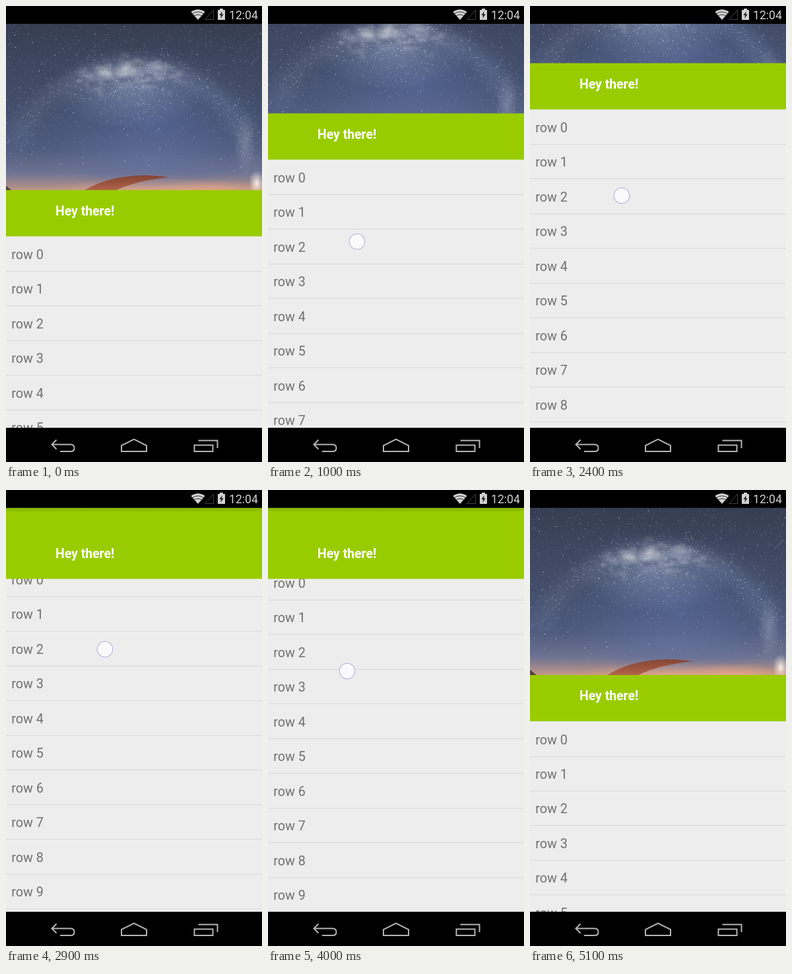
Animation of 388x690 px, one loop 5200 ms. Source, as an HTML page with a canvas:

```html
<!DOCTYPE html>
<html lang="en">
<head>
<meta charset="utf-8">
<title>Collapsing header</title>
<style>
html, body { margin: 0; width: 100%; height: 100%; overflow: hidden; background: #000; }
canvas { display: block; }
</style>
</head>
<body>
<canvas id="stage" width="388" height="690"></canvas>
<script>
const W = 388, LOOP = 5200, STEP = 100;
const BAR = 27, NAV = 638.25, HEADER_TOP = 278.5, HEADER_H = 70, ROW_H = 52.45;
const PIN = 214, FILL_START = 193;
const GREEN = '#99cc00', ICON = '#d2d2d2';
const ctx = document.getElementById('stage').getContext('2d');

// [time, value...]
const SCROLL = [[0, 0], [200, 0], [600, 38.5], [1100, 135], [1600, 213], [1900, 217], [2400, 192],
  [2900, 240], [3400, 285], [4000, 235], [4400, 110], [4800, 8], [5000, -1.5], [5100, -1.5]];
const TOUCH = [[200, 128, 468], [600, 131, 425], [1100, 136, 340], [1600, 142, 271], [1900, 143, 266],
  [2400, 139, 287], [2900, 150, 241], [3400, 153, 196], [4000, 120, 274], [4500, 112, 450]];

// Monotone cubic interpolation: never overshoots its keys.
function track(keys, t, col) {
  const last = keys.length - 1;
  if (t <= keys[0][0]) return keys[0][col];
  if (t >= keys[last][0]) return keys[last][col];
  const slope = i => (keys[i + 1][col] - keys[i][col]) / (keys[i + 1][0] - keys[i][0]);
  const tangent = i => {
    if (i === 0 || i === last) return 0;
    const a = slope(i - 1), b = slope(i);
    return a * b <= 0 ? 0 : 2 * a * b / (a + b);
  };
  const i = keys.findIndex(k => k[0] > t) - 1;
  const h = keys[i + 1][0] - keys[i][0], u = (t - keys[i][0]) / h, v = 1 - u;
  return keys[i][col] * v * v * (1 + 2 * u) + keys[i + 1][col] * u * u * (3 - 2 * u)
    + h * u * v * (tangent(i) * v - tangent(i + 1) * u);
}

function random(seed) {
  return () => (seed = (seed * 16807) % 2147483647) / 2147483647;
}

function makeSky() {
  const H = 254, sky = document.createElement('canvas');
  sky.width = W;
  sky.height = H;
  const c = sky.getContext('2d'), rnd = random(71);
  const bell = () => rnd() + rnd() + rnd() - 1.5;

  const base = c.createLinearGradient(0, 0, 0, H);
  [[0, '#363d52'], [.25, '#3e475f'], [.5, '#434e6c'], [.75, '#505c7e'], [.89, '#6d7392'],
    [.95, '#9c868c'], [1, '#c79a85']].forEach(([p, color]) => base.addColorStop(p, color));
  c.fillStyle = base;
  c.fillRect(0, 0, W, H);

  function glow(x, y, rx, ry, rgb, alpha) {
    c.save();
    c.translate(x, y);
    c.scale(rx, ry);
    const g = c.createRadialGradient(0, 0, 0, 0, 0, 1);
    g.addColorStop(0, `rgba(${rgb},${alpha})`);
    g.addColorStop(.5, `rgba(${rgb},${alpha * .45})`);
    g.addColorStop(1, `rgba(${rgb},0)`);
    c.fillStyle = g;
    c.fillRect(-1, -1, 2, 2);
    c.restore();
  }

  // Point on the arch of the galaxy; a runs from 0 (left) to 1 (right).
  const arch = a => {
    const angle = Math.PI * (1 - a);
    return [192 + 184 * Math.cos(angle), 236 - 168 * Math.pow(Math.sin(angle), .9)];
  };

  // Haze inside the arch, brightest just below its top
  glow(225, 150, 170, 110, '84,102,150', .75);
  glow(190, 98, 120, 62, '148,160,190', .5);
  glow(215, 205, 160, 50, '112,124,168', .4);
  for (let a = .1; a < 1; a += .02) {
    const [x, y] = arch(a);
    glow(x, y, 30, 24, '138,151,184', .05 + .06 * a * Math.sin(a * Math.PI));
  }
  for (let i = 0; i < 90; i++) {
    const x = 185 + bell() * 80, y = 74 + bell() * 24 + Math.abs(x - 185) * .12;
    glow(x, y, 4 + rnd() * 11, 3 + rnd() * 6, '215,220,228', .15);
  }
  glow(152, 74, 24, 14, '232,232,230', .4);
  glow(181, 69, 18, 14, '245,242,238', .55);
  glow(228, 66, 30, 11, '226,230,238', .45);
  glow(200, 62, 16, 6, '70,72,90', .5);
  glow(362, 180, 16, 48, '190,192,208', .3);
  glow(380, 242, 12, 20, '255,246,236', .95);
  glow(225, 253, 165, 20, '239,174,139', .65);
  glow(315, 253, 90, 18, '236,168,137', .6);

  const star = (x, y, alpha, size) => {
    c.fillStyle = `rgba(222,229,244,${alpha})`;
    c.fillRect(x, y, size, size);
  };
  for (let i = 0; i < 2600; i++) {
    const y = rnd() * 232;
    star(rnd() * W, y, rnd() * .32 * (1 - y / 350), .7 + rnd() * .8);
  }
  for (let i = 0; i < 700; i++) {
    const [x, y] = arch(.08 + rnd() * .9);
    star(x + bell() * 30, y + bell() * 30, .1 + rnd() * .35, .6 + rnd());
  }
  for (let i = 0; i < 700; i++) star(195 + bell() * 95, 95 + bell() * 60, .1 + rnd() * .35, .6 + rnd());
  for (let i = 0; i < 45; i++) star(rnd() * W, rnd() * 215, .6, 1.4);
  c.strokeStyle = 'rgba(175,182,200,.4)';
  c.beginPath();
  c.moveTo(371, 61);
  c.lineTo(384, 49);
  c.stroke();

  // Rock on the horizon
  const rock = c.createLinearGradient(0, 226, 0, H);
  rock.addColorStop(0, '#7d4336');
  rock.addColorStop(.45, '#97503b');
  rock.addColorStop(1, '#b3674c');
  c.fillStyle = rock;
  c.beginPath();
  c.moveTo(116, H);
  c.bezierCurveTo(145, 234, 195, 224, 246, 232);
  c.bezierCurveTo(216, 236, 190, 240, 162, H);
  c.fill();
  c.fillStyle = '#53403f';
  c.beginPath();
  c.moveTo(0, 245);
  c.lineTo(11, H);
  c.lineTo(0, H);
  c.fill();
  return sky;
}

const sky = makeSky();

function rect(x, y, w, h, color) {
  ctx.fillStyle = color;
  ctx.fillRect(x, y, w, h);
}

function text(str, x, y, font, color) {
  ctx.font = font + ' Roboto, sans-serif';
  ctx.fillStyle = color;
  ctx.fillText(str, x, y);
}

function path(d, color, width) {
  const p = new Path2D(d);
  if (width) {
    ctx.strokeStyle = color;
    ctx.lineWidth = width;
    ctx.stroke(p);
  } else {
    ctx.fillStyle = color;
    ctx.fill(p);
  }
}

function drawList(s) {
  rect(0, BAR, W, 690 - BAR, '#ededed');
  for (let i = 0; i < 20; i++) {
    const y = i * ROW_H - s;
    text('row ' + i, 8.2, Math.round(383 + y), '19.8px', '#707070');
    rect(0, Math.round(401 + y), W, 1, '#d9d9dc');
  }
}

function drawHeader(s) {
  const pinned = Math.min(s, PIN), top = HEADER_TOP - pinned;
  const fill = Math.max(0, Math.min(1, (s - FILL_START) / 8));
  ctx.save();
  ctx.beginPath();
  ctx.rect(0, BAR, W, Math.ceil(top) - BAR);
  ctx.clip();
  ctx.drawImage(sky, 0, BAR - Math.max(s, 0) / 2);
  ctx.restore();
  const greenTop = top - fill * (top - BAR);
  rect(0, greenTop, W, top + HEADER_H - greenTop, GREEN);
  if (fill === 1) {
    const shade = ctx.createLinearGradient(0, BAR, 0, BAR + 7);
    shade.addColorStop(0, 'rgba(0,0,0,.14)');
    shade.addColorStop(1, 'rgba(0,0,0,0)');
    rect(0, BAR, W, 7, shade);
  }
  text('Hey there!', 75, Math.floor(317 - pinned), 'bold 19.4px', '#fff');
}

function drawTouch(t) {
  if (t < TOUCH[0][0] || t > TOUCH[TOUCH.length - 1][0]) return;
  ctx.beginPath();
  ctx.arc(track(TOUCH, t, 1), track(TOUCH, t, 2), 11.8, 0, 7);
  ctx.fillStyle = 'rgba(251,251,253,.95)';
  ctx.fill();
  ctx.strokeStyle = '#c6c6df';
  ctx.lineWidth = 1.6;
  ctx.stroke();
}

function drawBars() {
  rect(0, 0, W, BAR, '#000');
  path('M291 21 L280.5 9 Q291 1.5 301.5 9 Z', ICON);
  path('M281.5 12.2 Q291 5.5 300.5 12.2 M284 15.6 Q291 10.5 298 15.6', '#333', 1);
  path('M301.5 20.5 L314.5 6 V20.5 Z', '#424242', 1);
  path('M321 6 H324 V4 H329 V6 H332 V21 H321 Z', ICON);
  path('M327.8 8 L323.3 14 H326 L325.2 19 L329.8 12.6 H327 Z', '#222');
  text('12:04', 338, 20, '17.6px', ICON);

  rect(0, NAV, W, 690 - NAV, '#000');
  const line = '#b4b4b4';
  path('M76.5 656.5 L69.5 663.5 L76.5 670.5 M70 663.5 H98 Q103.5 663.5 103.5 669 Q103.5 674 98 674 H82', line, 2);
  path('M175 674 V665 L194 655.5 L213 665 V674 Z', line, 2);
  path('M285.5 664.5 H313.5 V674 H285.5 Z M291.5 657.5 H320.5 V669', line, 2);
}

function frame(now) {
  const t = Math.floor(now % LOOP / STEP) * STEP;
  const s = Math.round(track(SCROLL, t, 1) * 2) / 2;
  drawList(s);
  drawHeader(s);
  drawTouch(t);
  drawBars();
}

const start = performance.now();
function tick() {
  frame(performance.now() - start);
  requestAnimationFrame(tick);
}
tick();
</script>
</body>
</html>
```
